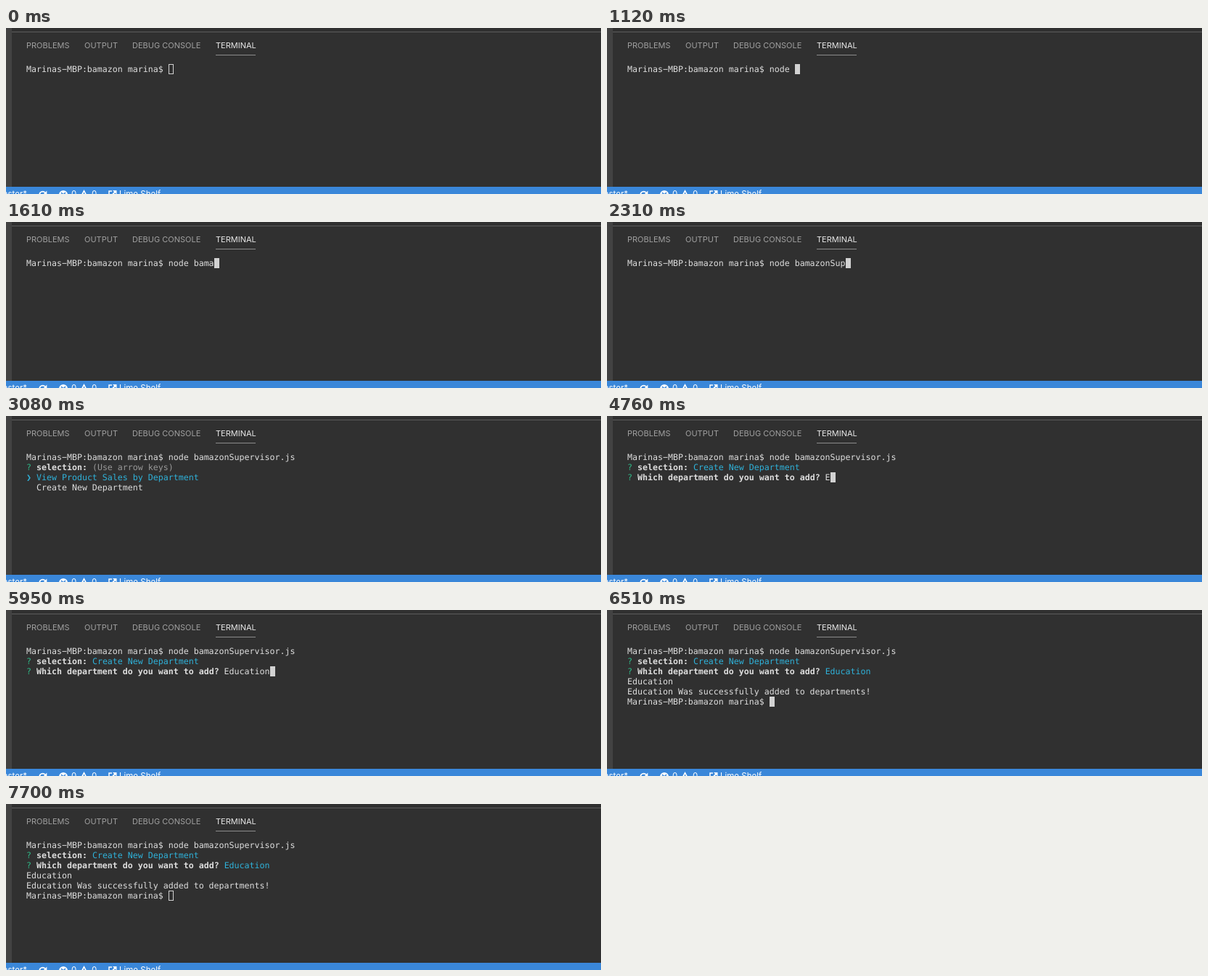
Write an HTML page with a canvas that moves like this. It is 820 px wide and 230 px high and loops after 7.77 s.

```html
<!DOCTYPE html>
<html lang="en">
<head>
<meta charset="utf-8">
<title>Terminal session</title>
<style>
html, body { margin: 0; width: 100%; height: 100%; overflow: hidden; background: #303030; }
#stage { position: relative; width: 820px; height: 230px; overflow: hidden; }
canvas { position: absolute; left: 0; top: 0; }
.ui { position: absolute; white-space: pre; font: 11px/14px Inter, Roboto, sans-serif; color: #a0a0a0; }
.ui.on { color: #e8e8e8; }
.ui.bar { font-size: 11.5px; color: #fff; }
#term {
  position: absolute; left: 28px; top: 50px; margin: 0; color: #dedede;
  font: 11.627px/14px "DejaVu Sans Mono", "Liberation Mono", monospace;
  text-rendering: geometricPrecision; font-variant-ligatures: none;
}
#term div { height: 14px; white-space: pre; }
.q { color: #2fb987; }
.c { color: #2fb2da; }
.d { color: #999; }
.p { display: inline-block; width: 7px; height: 14px; vertical-align: top; color: #2fb2da; }
#cursor { position: absolute; box-sizing: border-box; width: 7px; height: 14px; border: 1px solid #d2d2d2; }
</style>
</head>
<body>
<div id="stage">
  <canvas id="shapes" width="820" height="230"></canvas>
  <div id="term"></div>
  <div id="cursor"></div>
</div>
<script>
const LOOP = 7770, CELL = 7, ROW = 14, LEFT = 28, TOP = 50;
const stage = document.getElementById('stage');
const term = document.getElementById('term');
const cursor = document.getElementById('cursor');
const g = document.getElementById('shapes').getContext('2d');

const PROMPT = 'Marinas\u2212MBP:bamazon marina$ ';
const COMMAND = [
  [700, 'n'], [770, 'o'], [840, 'd'], [980, 'e'], [1120, ' '],
  [1330, 'b'], [1400, 'a'], [1540, 'm'], [1610, 'a'], [1820, 'z'], [1890, 'on'],
  [2100, 'S'], [2240, 'u'], [2310, 'p'], [2450, 'ervisor.js ']
];
const ANSWER = [
  [4760, 'E'], [4970, 'd'], [5040, 'u'], [5180, 'c'], [5320, 'a'],
  [5600, 't'], [5670, 'i'], [5810, 'o'], [5880, 'n']
];
const CHOICES = ['View Product Sales by Department', 'Create New Department'];
const QUESTION = 'Which department do you want to add?';
const TIME = { focus: 280, run: 2660, menu: 3080, down: 3570, pick: 3850, enter: 6230, saved: 6300, exit: 6370, blur: 7140 };

const typed = (keys, t) => keys.filter(k => k[0] <= t).map(k => k[1]).join('');
const span = (cls, s) => `<span class="${cls}">${s}</span>`;
const ask = s => `${span('q', '?')} <b>${s}</b> `;

function menuRows(active) {
  return CHOICES.map((s, i) => i === active ? span('p', '❯') + span('c', ' ' + s) : '  ' + s);
}

// Returns the terminal rows and the cursor cell, or no cell while it is hidden.
function screen(t) {
  const command = typed(COMMAND, t);
  const rows = [PROMPT + command];
  if (t < TIME.run) return { rows, cell: [PROMPT.length + command.length, 0] };
  if (t < TIME.menu) return { rows, cell: [0, 1] };
  if (t < TIME.pick) {
    const moved = t >= TIME.down;
    rows.push(ask('selection:') + (moved ? '' : span('d', '(Use arrow keys)')), ...menuRows(moved ? 1 : 0));
    return { rows };
  }
  const answer = typed(ANSWER, t);
  rows.push(ask('selection:') + span('c', CHOICES[1]));
  if (t < TIME.enter) {
    rows.push(ask(QUESTION) + answer);
    return { rows, cell: [QUESTION.length + 3 + answer.length, 2] };
  }
  rows.push(ask(QUESTION) + span('c', answer), answer);
  if (t >= TIME.saved) rows.push(answer + ' Was successfully added to departments!');
  if (t >= TIME.exit) rows.push(PROMPT);
  return { rows, cell: [t >= TIME.exit ? PROMPT.length : 0, t >= TIME.exit ? 5 : rows.length] };
}

function label(text, x, y, cls) {
  const el = document.createElement('div');
  el.className = 'ui ' + cls;
  el.textContent = text;
  el.style.top = y + 'px';
  if (cls.includes('end')) el.style.right = 820 - x + 'px';
  else el.style.left = x + 'px';
  stage.append(el);
}

function rect(color, x, y, w, h) {
  g.fillStyle = color;
  g.fillRect(x, y, w, h);
}

function line(color, width, ...pts) {
  g.strokeStyle = color;
  g.lineWidth = width;
  g.beginPath();
  for (let i = 0; i < pts.length; i += 2) g.lineTo(pts[i], pts[i + 1]);
  g.stroke();
}

function shape(...pts) {
  g.fillStyle = '#fff';
  g.beginPath();
  for (let i = 0; i < pts.length; i += 2) g.lineTo(pts[i], pts[i + 1]);
  g.fill();
}

function drawPanel() {
  const blue = '#3a87d9';
  rect('#303030', 0, 0, 820, 230);
  rect('#424242', 0, 0, 8, 220);
  rect('#5c5c5c', 8, 5, 812, 1);
  rect('#8c8c8c', 289, 37, 55, 1);
  rect(blue, 0, 220, 820, 10);

  // sync
  g.strokeStyle = '#fff';
  g.lineWidth = 1.8;
  g.beginPath();
  g.arc(50.5, 231, 4.3, Math.PI, -0.6);
  g.stroke();
  shape(56.3, 225.5, 56.3, 230, 51.8, 230);

  // errors
  g.fillStyle = '#fff';
  g.beginPath();
  g.arc(79, 231, 6, 0, Math.PI * 2);
  g.fill();
  line(blue, 1.6, 76, 228, 82, 234);
  line(blue, 1.6, 82, 228, 76, 234);

  // warnings
  shape(107.5, 224, 114, 236, 101, 236);
  rect(blue, 106.8, 228, 1.5, 4);

  // share
  line('#fff', 1.5, 146, 226, 142, 226, 142, 236);
  line('#fff', 1.8, 145.5, 232, 150.5, 227);
  shape(147, 225, 152.5, 225, 152.5, 230.5);
}

function drawLabels() {
  label('PROBLEMS', 28, 17, '');
  label('OUTPUT', 108, 17, '');
  label('DEBUG CONSOLE', 174, 17, '');
  label('TERMINAL', 289, 17, 'on');
  label('master*', 29, 223, 'bar end');
  label('0', 90, 223, 'bar');
  label('0', 118, 223, 'bar');
  label('Lime Shelf', 156, 223, 'bar');
}

let shown = '';
function frame(now) {
  const t = now % LOOP;
  const { rows, cell } = screen(t);
  const html = rows.map(r => `<div>${r}</div>`).join('');
  if (html !== shown) term.innerHTML = shown = html;
  cursor.style.display = cell ? 'block' : 'none';
  if (cell) {
    cursor.style.left = LEFT + cell[0] * CELL + 'px';
    cursor.style.top = TOP + cell[1] * ROW + 'px';
  }
  cursor.style.background = t >= TIME.focus && t < TIME.blur ? '#d2d2d2' : 'none';
  requestAnimationFrame(tick);
}

const start = performance.now();
function tick() { frame(performance.now() - start); }

drawPanel();
drawLabels();
tick();
</script>
</body>
</html>
```
